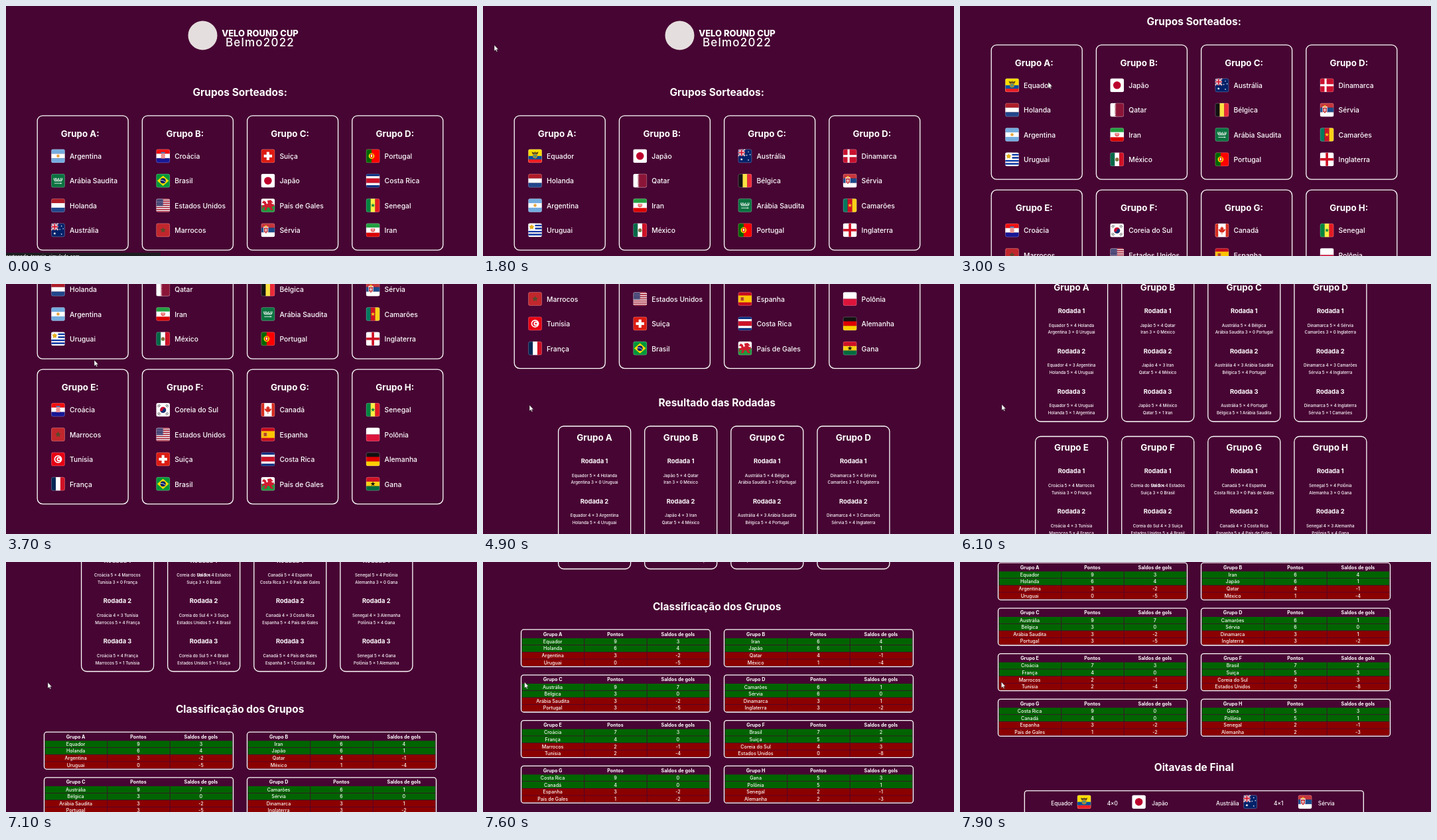
Animation of 710x378 px, one loop 8000 ms. Source, as an HTML page:

```html
<!DOCTYPE html>
<html lang="pt">
<head>
<meta charset="utf-8">
<title>Grupos Sorteados</title>
<style>
html, body { margin: 0; width: 100%; height: 100%; overflow: hidden; background: #470533; }
svg { display: block; position: absolute; left: 0; top: 0; }
text { font-family: Inter, "Open Sans", sans-serif; font-weight: 500; fill: #fff; white-space: pre; }
.mid { text-anchor: middle; }
.end { text-anchor: end; }
.bold { font-weight: 700; }
.card { fill: none; stroke: #fff; stroke-width: 1.3; }
</style>
</head>
<body>
<svg id="stage" width="710" height="378" viewBox="0 0 710 378"></svg>
<script>
// Shape helpers; flags are drawn on a 20 by 20 field.
const rect = (x, y, w, h, c) => `<rect x="${x}" y="${y}" width="${w}" height="${h}" fill="${c}"/>`;
const disc = (x, y, r, c) => `<circle cx="${x}" cy="${y}" r="${r}" fill="${c}"/>`;
const path = (d, c) => `<path d="${d}" fill="${c}"/>`;
const line = (d, c, w) => `<path d="${d}" fill="none" stroke="${c}" stroke-width="${w}"/>`;
const fill = c => rect(0, 0, 20, 20, c);
const rows = (...cs) => cs.map((c, i) => rect(0, i * 20 / cs.length, 20, 20 / cs.length + .05, c)).join('');
const cols = (...cs) => cs.map((c, i) => rect(i * 20 / cs.length, 0, 20 / cs.length + .05, 20, c)).join('');
const cross = (x, y, w, c) => rect(x - w / 2, 0, w, 20, c) + rect(0, y - w / 2, 20, w, c);
const star = (x, y, r, c) => {
  const pts = Array.from({ length: 10 }, (_, i) => {
    const a = i * Math.PI / 5, s = i % 2 ? r * .4 : r;
    return (x + s * Math.sin(a)).toFixed(2) + ' ' + (y - s * Math.cos(a)).toFixed(2);
  });
  return path('M' + pts.join('L') + 'Z', c);
};
const stripes = (n, a, b) => rows(...Array.from({ length: n }, (_, i) => i % 2 ? b : a));

const checker = () => {
  let s = rect(7, 6, 6, 7.5, '#fff');
  for (let i = 0; i < 25; i += 2) s += rect(7 + i % 5 * 1.2, 6 + Math.floor(i / 5) * 1.5, 1.2, 1.5, '#d22');
  return s + rect(7, 4.3, 6, 1.7, '#3b7fc4');
};
const dots = () => {
  let s = '';
  for (let i = 0; i < 20; i++) s += disc(1.2 + i % 5 * 1.9, 1.4 + Math.floor(i / 5) * 2.5, .45, '#fff');
  return s;
};
const union = rect(0, 0, 10, 10, '#012169') + line('M0 0L10 10M10 0L0 10', '#fff', 2) +
  line('M0 0L10 10M10 0L0 10', '#d01530', .7) + line('M5 0V10M0 5H10', '#fff', 3.2) +
  line('M5 0V10M0 5H10', '#d01530', 1.8);

const flags = {
  'Argentina': rows('#74acdf', '#fff', '#74acdf') + disc(10, 10, 2.2, '#e9a53a'),
  'Arábia Saudita': fill('#0b7340') + line('M4 6V9H6V6M7.5 6V9H9.5V7M11 6V9H13M14 6V9H16V6M4.5 10.4H15.5', '#fff', .9) + line('M4.5 13.8H15.5M13.8 12.8V14.8', '#fff', .8),
  'Holanda': rows('#ae1c28', '#fff', '#21468b'),
  'Austrália': fill('#012169') + union + star(5, 15, 2.2, '#fff') + star(15, 4, 1.2, '#fff') + star(12.6, 9, 1.2, '#fff') + star(17.5, 8, 1.2, '#fff') + star(15, 16, 1.3, '#fff'),
  'Croácia': rows('#f01010', '#fff', '#171796') + checker(),
  'Brasil': fill('#009739') + path('M10 2.5L18.5 10L10 17.5L1.5 10Z', '#fedd00') + disc(10, 10, 3.9, '#012169') + line('M6.3 9.2Q10.5 8.7 13.3 11.8', '#fff', .8),
  'Estados Unidos': stripes(13, '#b22234', '#fff') + rect(0, 0, 10, 10.8, '#3c3b6e') + dots(),
  'Marrocos': fill('#c1272d') + star(10, 10, 4.3, '#27582c') + star(10, 10, 2.2, '#7c3f2c'),
  'Suiça': fill('#dc1b12') + rect(8, 4, 4, 12, '#fff') + rect(4, 8, 12, 4, '#fff'),
  'Japão': fill('#fff') + disc(10, 10, 5.6, '#bc002d'),
  'País de Gales': rows('#fff', '#1d9a3e') + path('M1 6L4 3L7 5L8 8L10 7L9 3L14 2L18 6L15 6L16 8L19 8L18 12L15 12L18 17L14 17L12 13L9 13L8 17L4 17L6 13L4 12L1 16L2 10L5 9L4 7Z', '#d01c2e'),
  'Sérvia': rows('#c6363c', '#1b4a8a', '#fff') + path('M3.5 5H10.5V12Q10 15 7 16Q4 15 3.5 12Z', '#fff') + path('M4.2 6.5H9.8V12L7 15L4.2 12Z', '#c6363c') + rect(5.5, 3.2, 3, 2.4, '#edb92e') + line('M7 7.5V13M5 10H9', '#fff', .9),
  'Portugal': fill('#f00') + rect(0, 0, 8, 20, '#060') + disc(8, 10, 4.2, '#fe0') + path('M5.7 7H10.3V11.5Q8 15 5.7 11.5Z', '#e01010') + rect(7, 8, 2, 3.6, '#fff'),
  'Costa Rica': rows('#002b7f', '#fff', '#ce1126', '#ce1126', '#fff', '#002b7f'),
  'Senegal': cols('#00853f', '#fdef42', '#e31b23') + star(10, 10, 3.3, '#00853f'),
  'Iran': rows('#239f40', '#fff', '#da0000') + line('M0 6.7H20M0 13.3H20', '#fff', .9) + line('M8 7.8Q6.5 10.5 9 12M12 7.8Q13.5 10.5 11 12M10 7.5V12.7', '#da0000', 1),
  'Equador': fill('#ffdd00') + rect(0, 10, 20, 5, '#034ea2') + rect(0, 15, 20, 5, '#ed1c24') + path('M5 4L9 5L10 3.5L11 5L15 4L13.5 7.5H6.5Z', '#574521') + disc(10, 10, 3.5, '#b08a30') + disc(10, 10, 2, '#4f9a78'),
  'Qatar': fill('#fff') + path('M20 0H6' + 'l3 1.111l-3 1.111'.repeat(9) + 'H20Z', '#8a1538'),
  'Uruguai': stripes(9, '#fff', '#0038a8') + rect(0, 0, 10, 11.1, '#fff') + star(5, 5.5, 4.4, '#d9a520') + disc(5, 5.5, 2.7, '#e5b020'),
  'México': cols('#006847', '#fff', '#ce1126') + disc(10, 10, 2.6, '#8b6b3d') + line('M7.5 11Q10 14 12.5 11', '#53853e', 1),
  'Bélgica': cols('#111', '#fae042', '#ed2939'),
  'Dinamarca': fill('#c8102e') + cross(8, 10, 3, '#fff'),
  'Camarões': cols('#007a5e', '#ce1126', '#fcd116') + star(10, 10, 3.2, '#fcd116'),
  'Inglaterra': fill('#fff') + cross(10, 10, 3.6, '#ce1124'),
  'Tunísia': fill('#e70013') + disc(10, 10, 5.8, '#fff') + disc(10, 10, 4.1, '#e70013') + disc(11.2, 10, 3.3, '#fff') + star(11.2, 10, 2.2, '#e70013'),
  'França': cols('#002654', '#fff', '#ce1126'),
  'Coreia do Sul': fill('#fff') + disc(10, 10, 4.4, '#c60c30') + path('M5.6 10A4.4 4.4 0 0 0 14.4 10A2.2 2.2 0 0 0 10 10A2.2 2.2 0 0 1 5.6 10Z', '#003478') + line('M2 5L5 2M3.3 6.3L6.3 3.3M15 2L18 5M13.7 3.3L16.7 6.3M2 15L5 18M3.3 13.7L6.3 16.7M15 18L18 15M13.7 16.7L16.7 13.7', '#222', .9),
  'Canadá': fill('#fff') + rect(0, 0, 4.5, 20, '#d52b1e') + rect(15.5, 0, 4.5, 20, '#d52b1e') + path('M10 4L11.3 6.5L12.5 6L12.2 9L14.5 8L15 9.5L12.3 13H10.4V16H9.6V13H7.7L5 9.5L5.5 8L7.8 9L7.5 6L8.7 6.5Z', '#d52b1e'),
  'Espanha': fill('#c60b1e') + rect(0, 5, 20, 10, '#ffc400') + rect(4, 7.5, 4, 5, '#b5402a') + rect(2.7, 7.5, .8, 5, '#c9a07a') + rect(8.5, 7.5, .8, 5, '#c9a07a'),
  'Polônia': rows('#fff', '#dc143c'),
  'Alemanha': rows('#111', '#d00', '#ffce00'),
  'Gana': rows('#ce1126', '#fcd116', '#006b3f') + star(10, 10, 3.6, '#111')
};
const ids = Object.keys(flags);

const parse = s => s.split('|').map(g => g.split(','));
const firstDraw = parse('Argentina,Arábia Saudita,Holanda,Austrália|Croácia,Brasil,Estados Unidos,Marrocos|' +
  'Suiça,Japão,País de Gales,Sérvia|Portugal,Costa Rica,Senegal,Iran');
const draw = parse('Equador,Holanda,Argentina,Uruguai|Japão,Qatar,Iran,México|Austrália,Bélgica,Arábia Saudita,Portugal|' +
  'Dinamarca,Sérvia,Camarões,Inglaterra|Croácia,Marrocos,Tunísia,França|Coreia do Sul,Estados Unidos,Suiça,Brasil|' +
  'Canadá,Espanha,Costa Rica,País de Gales|Senegal,Polônia,Alemanha,Gana');
const ranking = parse('Equador 9 3,Holanda 6 4,Argentina 3 -2,Uruguai 0 -5|Iran 6 4,Japão 6 1,Qatar 4 -1,México 1 -4|' +
  'Austrália 9 7,Bélgica 3 0,Arábia Saudita 3 -2,Portugal 3 -5|Camarões 6 1,Sérvia 6 0,Dinamarca 3 1,Inglaterra 3 -2|' +
  'Croácia 7 3,França 4 0,Marrocos 2 -1,Tunísia 2 -4|Brasil 7 2,Suiça 5 3,Coreia do Sul 4 3,Estados Unidos 0 -8|' +
  'Costa Rica 9 0,Canadá 4 0,Espanha 3 -2,País de Gales 1 -2|Gana 5 3,Polônia 5 1,Senegal 2 -1,Alemanha 2 -3');
// Each round: home index, score, score, away index.
const rounds = ['0541 2303', '0432 1543', '0543 1512'];

// Text is placed by the middle of its capitals.
const text = (x, y, size, str, cls = '') =>
  `<text x="${x}" y="${(y + size * .364).toFixed(2)}" font-size="${size}" class="${cls}">${str}</text>`;
const mid = (x, y, size, str, cls = '') => text(x, y, size, str, 'mid ' + cls);
const card = (x, y, w, h, r) => `<rect class="card" x="${x}" y="${y}" width="${w}" height="${h}" rx="${r}"/>`;
const flag = (x, y, name) => `<use href="#flag${ids.indexOf(name)}" transform="translate(${x} ${y}) scale(1.03)"/>`;
const letter = i => 'Grupo ' + 'ABCDEFGH'[i];

const cardX = i => 47.2 + i % 4 * 158.2;
const cardY = i => i < 4 ? 165.8 : 385.2;
const teams = (names, i) => names.map((n, k) => {
  const y = cardY(i) + 61.5 + k * 37.35;
  return flag(cardX(i) + 21, y - 10.8, n) + text(cardX(i) + 48.8, y, 10.35, n);
}).join('');
const groupCard = i => card(cardX(i), cardY(i), 137, 203.4, 8) +
  mid(cardX(i) + 64.5, cardY(i) + 27, 13.35, letter(i) + ':', 'bold');

const resultCard = i => {
  const x = 113.6 + i % 4 * 130.1, y = i < 4 ? 676 : 918.5, c = x + 54.4;
  let s = card(x, y, 109, 220, 8) + mid(c, y + 16.7, 13.4, letter(i), 'bold');
  rounds.forEach((r, k) => {
    const top = y + 52.3 + k * 60.9;
    s += mid(c, top, 9.35, 'Rodada ' + (k + 1), 'bold');
    r.split(' ').forEach(([a, p, q, b], j) => {
      let away = draw[i][b];
      const ly = top + 22 + j * 10.7;
      // The one long pairing wraps onto itself.
      if (draw[i][a].length + away.length > 26) {
        const [head, tail] = away.split(' ');
        away = head;
        s += mid(c, ly, 6.22, tail);
      }
      s += mid(c, ly, 6.22, `${draw[i][a]} ${p} × ${q} ${away}`);
    });
  });
  return s;
};

const table = (list, i) => {
  const x = 57.5 + i % 2 * 306, y = 1230.2 + Math.floor(i / 2) * 68.7;
  const at = k => x + 47.6 + k * 94.4;
  let s = ['Grupo', 'Pontos', 'Saldos de gols'].map((h, k) =>
    mid(at(k), y + 6.9, 7.2, k ? h : letter(i), 'bold')).join('');
  list.forEach((entry, r) => {
    const ry = y + 18 + r * 10.65;
    entry.match(/(.+) (\S+) (\S+)/).slice(1).forEach((v, k) => {
      s += rect(x + 1.3 + k * 94.4, ry - 4.9, 93.6, 9.9, r < 2 ? '#006400' : '#8b0000') + mid(at(k), ry, 7.15, v);
    });
  });
  return s + card(x, y, 285, 56.1, 4);
};

const match = (x, a, score, b) => text(x, 1594.3, 8.25, a, 'end') +
  flag(x + 6.5, 1581.4, a) + mid(x + 59.5, 1594.3, 8.25, score) +
  flag(x + 89, 1581.4, b) + text(x + 119, 1594.3, 8.25, b);
const heading = (y, str) => mid(352.7, y, 15.5, str, 'bold');

const stage = document.getElementById('stage');
stage.innerHTML = `<defs><clipPath id="round"><rect width="20" height="20" rx="2.6"/></clipPath>` +
  ids.map((n, i) => `<g id="flag${i}"><g clip-path="url(#round)">${flags[n]}</g>
    <rect x=".3" y=".3" width="19.4" height="19.4" rx="2.4" fill="none" stroke="#fff" stroke-opacity=".4" stroke-width=".6"/></g>`).join('') +
  `</defs>${rect(0, 0, 710, 378, '#470533')}<g id="page">` +
  disc(296.5, 44.5, 22, '#e5dede') +
  '<text x="383" y="46" class="mid" font-size="13" style="font-weight:800">VELO ROUND CUP</text>' +
  '<text x="383" y="61" class="mid" font-size="17" letter-spacing="1.2">Belmo2022</text>' +
  heading(130.6, 'Grupos Sorteados:') +
  draw.map((g, i) => groupCard(i) + (i < 4 ? '' : teams(g, i))).join('') +
  `<g id="before">${firstDraw.map(teams).join('')}</g><g id="after">${draw.slice(0, 4).map(teams).join('')}</g>` +
  heading(640, 'Resultado das Rodadas') + draw.map((_, i) => resultCard(i)).join('') +
  heading(1195.5, 'Classificação dos Grupos') + ranking.map(table).join('') +
  heading(1539.6, 'Oitavas de Final') + card(97.3, 1574.8, 511, 90, 4) +
  match(170.3, 'Equador', '4×0', 'Japão') + match(420.8, 'Austrália', '4×1', 'Sérvia') +
  `</g><g id="status">${rect(0, 373, 233, 5, '#1d1c20')}<text x="0" y="381" font-size="7">sorteando-torneio-simulado.com</text></g>
  <path id="cursor" d="M0 0V9L2.1 7.3L3.5 10.3L4.8 9.7L3.5 6.7H6.2Z" fill="#fff" stroke="#222" stroke-width=".5"/>`;

// Time in ms, then the values reached.
const scrollKeys = [[2300, 0], [2800, 100], [2900, 100], [3700, 256], [3800, 256], [4700, 430],
  [5600, 678], [6000, 678], [6900, 973], [7200, 973], [7900, 1229]];
const cursorKeys = [[1100, 14, -14], [1800, 17, 59], [2000, 75, 112], [2200, 133, 115], [3800, 133, 115],
  [4700, 70, 183], [4900, 70, 183], [5600, 63, 182], [7200, 63, 182], [7900, 62.3, 181.3]];

const sample = (keys, t) => {
  const n = keys.findIndex(k => k[0] > t);
  if (n < 0) return keys[keys.length - 1].slice(1);
  if (n === 0) return keys[0].slice(1);
  const a = keys[n - 1], b = keys[n], u = (t - a[0]) / (b[0] - a[0]), e = u * u * (3 - 2 * u);
  return a.slice(1).map((v, i) => v + (b[i + 1] - v) * e);
};

const [page, before, after, status, cursor] = ['page', 'before', 'after', 'status', 'cursor']
  .map(id => document.getElementById(id));
const show = (el, on) => el.setAttribute('visibility', on ? 'visible' : 'hidden');
const start = performance.now();

function render() {
  const t = Math.floor((performance.now() - start) % 8000 / 100) * 100;
  page.setAttribute('transform', `translate(0 ${-Math.round(sample(scrollKeys, t)[0])})`);
  cursor.setAttribute('transform', `translate(${sample(cursorKeys, t).join(' ')})`);
  show(before, t < 500);
  show(after, t >= 500);
  show(status, t < 1000);
  requestAnimationFrame(render);
}
render();
</script>
</body>
</html>
```
